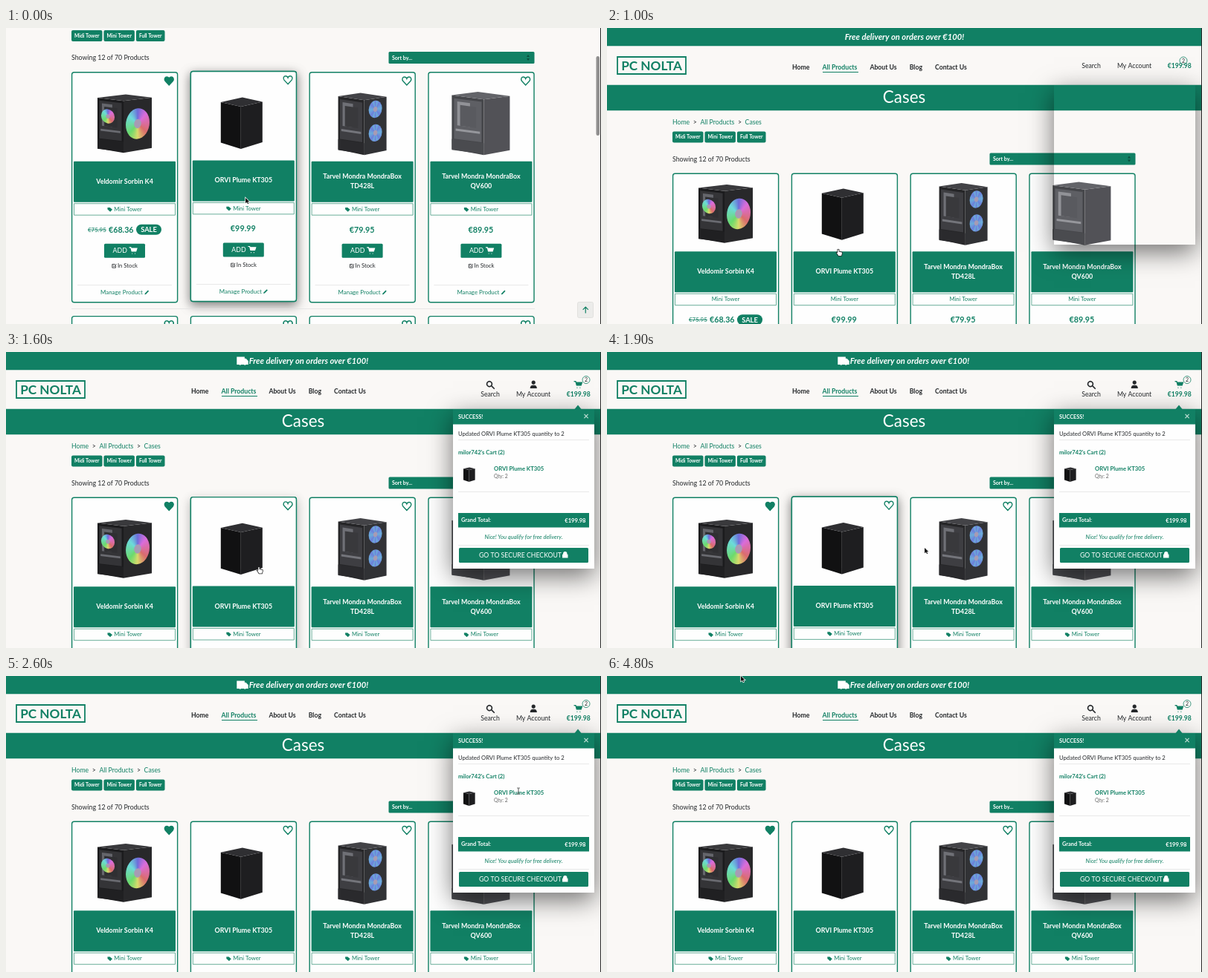
Animation of 800 by 399 pixels, one loop 4.9 s. Source, as an HTML page with a canvas:

```html
<!DOCTYPE html>
<html lang="en">
<head>
<meta charset="utf-8">
<title>Shop cart</title>
<style>
html, body { margin: 0; width: 100%; height: 100%; overflow: hidden; background: #faf8f6; }
canvas { display: block; width: 100vw; height: 100vh; }
</style>
</head>
<body>
<canvas id="stage" width="800" height="399"></canvas>
<script>
const W = 800, H = 399, LOOP = 4900, STEP = 100, RELOAD = 1000;
const SCROLL = 136.5, LEFT = 88, PITCH = 159.8, CARD_W = 142;
const GREEN = '#118064', CREAM = '#faf8f6', INK = '#25282b', LINE = '#e2e2e2';
const stage = document.getElementById('stage').getContext('2d');
let g = stage;

const clamp = v => Math.max(0, Math.min(1, v));
const mix = (a, b, k) => a + (b - a) * k;
const span = (t, a, b) => clamp((t - a) / (b - a));
const ramp = (t, a, b) => { const k = span(t, a, b); return k * k * (3 - 2 * k); };

// Outlines on a 16 unit grid
const ICONS = {
  heart: 'M8 15L1.5 8C-1 5 1 1 4 1Q7 1 8 4Q9 1 12 1C15 1 17 5 14.5 8Z',
  cart: 'M0 1H3L5 9H14L16 3H4M6 14h0M12 14h0',
  tag: 'M0 2H8L16 9 9 16 0 8Z',
  pencil: 'M1 15L2 11 12 1 15 4 5 14Z',
  truck: 'M0 2H10V5H13L16 8V12H0ZM4 13h0M12 13h0',
  user: 'M8 0A4 4 0 1 1 7.9 0ZM1 16Q1 9 8 9.5Q15 9 15 16Z',
  search: 'M11 6.5A4.8 4.8 0 1 1 11 6.4M10 10L15 15',
  lock: 'M2 8H14V15H2ZM4 8V5A4 4 0 0 1 12 5V8',
  check: 'M13 8V14H2V3H10M5 7.5L8 10.5 14.5 3',
  up: 'M8 15V2M2.5 7.5L8 2 13.5 7.5',
  arrow: 'M0 0V13.5L3.5 11 6 15.5 8 14.5 5.5 10H10Z',
  hand: 'M4 1.5Q5.3 0 6.5 1.5V6L14 8V11L12.5 16H6L1.5 9H4Z'
};
for (const k in ICONS) ICONS[k] = new Path2D(ICONS[k]);

function icon(name, x, y, size, fill, line = 0, stroke = fill) {
  g.save();
  g.translate(x, y);
  g.scale(size / 16, size / 16);
  g.lineCap = 'round';
  g.lineWidth = line;
  g.strokeStyle = stroke;
  if (line) g.stroke(ICONS[name]);
  if (fill) { g.fillStyle = fill; g.fill(ICONS[name]); }
  g.restore();
}

const outline = (name, x, y, size, color, line = 2) => icon(name, x, y, size, null, line, color);

function text(s, x, y, size, color, style = '', align = 'left') {
  g.font = `${style} ${size}px Lato, sans-serif`;
  g.textAlign = align;
  g.fillStyle = color;
  g.fillText(s, x, y + size * 0.36);
  return g.measureText(s).width;
}

function row(words, x, y, size, gap, style, color) {
  for (const s of words) x += text(s, x, y, size, color(s), style) + gap;
}

function rect(x, y, w, h, fill, r = 0, stroke = null, line = 1) {
  g.beginPath();
  g.roundRect(x, y, w, h, r);
  if (fill) { g.fillStyle = fill; g.fill(); }
  if (stroke) { g.strokeStyle = stroke; g.lineWidth = line; g.stroke(); }
}

function poly(color, ...points) {
  g.beginPath();
  for (const p of points) g.lineTo(...p);
  g.closePath();
  g.fillStyle = color;
  g.fill();
}

function oval(x, y, rx, ry, fill) {
  g.beginPath();
  g.ellipse(x, y, rx, ry, 0, 0, 7);
  g.fillStyle = fill;
  g.fill();
}

function shadowed(alpha, blur, dy, draw) {
  g.save();
  g.shadowColor = `rgba(0,0,0,${alpha})`;
  g.shadowBlur = blur;
  g.shadowOffsetY = dy;
  draw();
  g.restore();
}

function fan(x, y, rx, ry, hue, range) {
  const glow = g.createConicGradient(0, x, y), n = 12;
  for (let i = 0; i <= n; i++) {
    const h = range < 360 ? hue + range * Math.sin(i * Math.PI) + range * (i % 2) : hue + range * i / n;
    glow.addColorStop(i / n, `hsl(${h},60%,64%)`);
  }
  oval(x, y, rx, ry, glow);
  oval(x, y, rx * 0.3, ry * 0.3, '#a79bb4');
}

// Maps a unit square onto a slanted face.
function onFace([x0, y0], [x1, y1], h, draw) {
  g.save();
  g.transform(x1 - x0, y1 - y0, 0, h, x0, y0);
  draw();
  g.restore();
}

// A box seen at its near corner; edges recede by the slope.
function tower({ l, m, r, y, h, slope, tone, side, front }) {
  const grey = k => `hsl(230,3%,${tone + k}%)`;
  const top = x => [x, y - slope * Math.abs(x - m)];
  const low = x => [x, y + h - slope * 1.4 * Math.abs(x - m)];
  const back = [l + r - m, y - slope * (r - l)];
  poly(grey(0), top(l), top(m), low(m), low(l));
  poly(grey(5), top(m), top(r), low(r), low(m));
  poly(grey(12), top(l), back, top(r), top(m));
  if (side) onFace(top(l), top(m), h - slope * 10, () => side(grey));
  if (front) onFace(top(m), top(r), h - slope * 10, front);
}

function glass(grey) {
  rect(0.07, 0.05, 0.86, 0.74, grey(10));
  rect(0.17, 0.1, 0.4, 0.44, grey(30));
  rect(0.26, 0.16, 0.5, 0.38, grey(8));
  rect(0.12, 0.6, 0.76, 0.04, grey(32));
  rect(0, 0.8, 1, 0.2, grey(2));
}

const ITEM = 'ORVI Plume KT305', BOX = 'Tarvel Mondra MondraBox';
const PRODUCTS = [
  {
    name: ['Veldomir Sorbin K4'], price: '€68.36', was: '€75.95', liked: true,
    box: {
      l: 35, m: 70, r: 108, y: 39, h: 70, slope: 0.12, tone: 11,
      side: grey => { glass(grey); fan(0.4, 0.34, 0.26, 0.14, 330, 360); },
      front: () => fan(0.5, 0.48, 0.42, 0.3, 330, 360)
    }
  },
  { name: [ITEM], price: '€99.99', box: { l: 41, m: 68, r: 97, y: 48, h: 57, slope: 0.22, tone: 7 } },
  {
    name: [BOX, 'TD428L'], price: '€79.95',
    box: {
      l: 39, m: 74, r: 104, y: 38, h: 74, slope: 0.15, tone: 15, side: glass,
      front: () => { for (const y of [0.2, 0.64]) fan(0.5, y, 0.3, 0.16, 205, 25); }
    }
  },
  { name: [BOX, 'QV600'], price: '€89.95', box: { l: 32, m: 75, r: 110, y: 37, h: 75, slope: 0.13, tone: 28, side: glass } }
];

function addButton(hover) {
  const e = hover;
  rect(44 - e, 231.5 - e, 55 + 2 * e, 19 + 2 * e, GREEN, 1.5);
  g.globalAlpha = hover;
  rect(44, 231.5, 55, 19, '#fff', 1);
  g.globalAlpha = 1;
  const ink = hover > 0.5 ? GREEN : '#fff';
  text('ADD', 55.5, 241, 8.8, ink);
  icon('cart', 78, 236, 10, ink, 1.8);
}

function price({ price, was }) {
  const mid = CARD_W / 2, y = 212.5;
  if (!was) return text(price, mid, y, 10.8, GREEN, 'bold', 'center');
  rect(22, y, text(was, 22, y, 7.9, GREEN), 0.8, GREEN);
  text(price, 50, y, 10.7, GREEN, 'bold');
  rect(87, y - 7, 34, 14, GREEN, 7);
  text('SALE', 104, y, 9.3, '#fff', 'bold', 'center');
}

function frame(x, y, lift) {
  const draw = () => rect(x + 0.6, y + 0.6, CARD_W, 310, '#fefefe', 3, GREEN, 1.4);
  if (lift) shadowed(0.5 * lift, 14, 4, draw);
  draw();
}

function card(i, dy, lift, ready, hover) {
  const p = PRODUCTS[i], x = LEFT + i * PITCH, y = 59.2 + dy - 1.3 * lift, mid = 71.5;
  frame(x, y, lift);
  g.save();
  g.translate(x, y);
  if (ready) icon('heart', 125, 6, 12.5, p.liked ? GREEN : null, 1.8, GREEN);
  else g.translate(0, -15);
  tower(p.box);
  rect(3, 120.5, 137, 55, GREEN, 1);
  p.name.forEach((s, k) => text(s, mid, 147.3 + (k - (p.name.length - 1) / 2) * 13.2, 8.9, '#fff', 'bold', 'center'));
  rect(3.5, 177.5, 136, 15.5, null, 0, '#5aa58f', 0.9);
  text('Mini Tower', ready ? mid + 4.5 : mid, 185, 7.6, GREEN, '', 'center');
  if (ready) icon('tag', 48.5, 182, 6.5, GREEN);
  price(p);
  addButton(hover);
  outline('check', 54, 258, 6.8, INK);
  text('In Stock', 62, 261.5, 7.7, INK);
  rect(8, 287, 127, 0.8, LINE);
  text('Manage Product', 39, 297.2, 7.9, GREEN);
  icon('pencil', 98, 294, 6.5, GREEN);
  g.restore();
}

function filters(dy) {
  let x = LEFT;
  for (const size of ['Midi', 'Mini', 'Full']) {
    g.font = 'bold 6.7px Lato, sans-serif';
    const s = size + ' Tower', w = g.measureText(s).width + 8;
    rect(x, 3 + dy, w, 15, GREEN, 2);
    text(s, x + 4, 10.5 + dy, 6.7, '#fff', 'bold');
    x += w + 2;
  }
  text('Showing 12 of 70 Products', LEFT, 40 + dy, 8.8, INK);
  rect(514.5, 32 + dy, 196, 16, GREEN, 1.5);
  text('Sort by...', 519, 40 + dy, 7, '#fff', 'bold');
  for (const s of [-1, 1]) {
    const y = 40 + dy + s;
    poly('#0a4d3c', [700, y], [702, y + 3 * s], [704, y]);
  }
}

function shop(t, dy, ready) {
  filters(dy);
  const fresh = t >= RELOAD;
  const lifts = [
    0,
    fresh ? ramp(t, 1500, 1700) * (1 - ramp(t, 1900, 2400)) : 1,
    ramp(t, 1900, 2200) * (1 - ramp(t, 2200, 2600)),
    0
  ];
  const press = fresh ? 0 : ramp(t, 200, 500);
  lifts.forEach((v, i) => card(i, dy, v, ready, i === 1 ? press : 0));
}

function fold(t) {
  rect(LEFT, 378, 623, 0.8, LINE);
  for (let i = 0; i < PRODUCTS.length; i++) {
    frame(LEFT + i * PITCH, 388, 0);
    outline('heart', 213 + i * PITCH, 394, 12.5, GREEN);
  }
  rect(768.5, 369.5, 21, 21, '#ececea', 2, '#dcdcda', 0.8);
  outline('up', 774.5, 375, 9.5, GREEN);
  rect(793.5, 38, 4.5, 107, `rgba(125,125,125,${0.85 * (1 - ramp(t, 0, 400))})`, 2.2);
}

function header(ready) {
  rect(0, 0, W, 24.3, GREEN);
  text('Free delivery on orders over €100!', ready ? 407 : 400, 12.3, 11.2, '#fff', 'italic bold', 'center');
  rect(14, 39, 92, 23, null, 0, GREEN, 1.8);
  text('PC NOLTA', 60, 50.5, 17.2, GREEN, 'bold', 'center');

  const here = 'All Products';
  row(['Home', here, 'About Us', 'Blog', 'Contact Us'], 249, 52.8, 8.7, 17, 'bold', s => s === here ? GREEN : INK);
  rect(290, 59, 48, 1, GREEN);
  const y = ready ? 57 : 50.5;
  text('Search', 651, y, 8.7, INK, '', 'center');
  text('My Account', 709, y, 8.7, INK, '', 'center');
  text('€199.98', 769.7, y, 8.6, GREEN, 'bold', 'center');
  if (ready) {
    icon('truck', 311.5, 6, 13, '#fff', 3);
    outline('search', 645.5, 38.5, 11.5, INK, 2.3);
    icon('user', 704, 38.5, 10.5, INK);
    icon('cart', 764, 39, 10.5, GREEN, 1.8);
  }
  const bx = ready ? 780 : 775, by = ready ? 37.5 : 44;
  rect(bx - 5, by - 5, 10, 10, null, 5, GREEN, 0.8);
  text('2', bx, by, 7, INK, '', 'center');

  rect(0, 76.7, W, 34.6, GREEN);
  text('Cases', 399.5, 92.5, 22.4, '#fff', '', 'center');
  row(['Home', '>', here, '>', 'Cases'], LEFT, 126.7, 8.7, 4.6, '', s => s === '>' ? INK : GREEN);
}

const TOAST = [601, 77, 190, 215];

function cartPanel() {
  poly(GREEN, [764.5, 77], [769, 71.5], [773.5, 77]);
  rect(...TOAST, '#fefefe');
  rect(601, 77, 190, 20.5, GREEN);
  text('SUCCESS!', 608, 87.3, 7.3, '#fff', 'bold');
  text('×', 780, 86.5, 13, '#b9d9cf', 'bold', 'center');
  text(`Updated ${ITEM} quantity to 2`, 608, 110, 7.7, INK);
  text("milor742's Cart (2)", 608, 135, 7.6, GREEN, 'bold');
  for (const y of [118, 188, 260]) rect(608, y, 176, 0.8, LINE);
  g.save();
  g.translate(603.5, 145.5);
  g.scale(0.28, 0.28);
  tower(PRODUCTS[1].box);
  g.restore();
  text(ITEM, 656, 157.2, 7.7, GREEN, 'bold');
  text('Qty: 2', 656, 168, 6.8, '#666');
  rect(608, 217, 176, 19.5, GREEN);
  text('Grand Total:', 612, 226.8, 7.4, '#fff', 'bold');
  text('€199.98', 779.5, 226.8, 7.6, '#fff', 'bold', 'right');
  text('Nice! You qualify for free delivery.', 696, 249, 7.6, GREEN, 'italic', 'center');
  rect(609, 264, 174, 20, GREEN, 1.5);
  text('GO TO SECURE CHECKOUT', 636, 274, 8.7, '#fff');
  icon('lock', 747.5, 269, 8.5, '#fff', 2);
}

// Drawn once, so that the whole panel fades as one.
const panel = document.createElement('canvas');
panel.width = W;
panel.height = H;
g = panel.getContext('2d');
cartPanel();
g = stage;

function showPanel(t) {
  g.save();
  g.beginPath();
  g.rect(0, 0, W, H);
  g.rect(...TOAST);
  g.clip('evenodd');
  shadowed(0.55, 32, 10, () => rect(...TOAST, '#000'));
  g.restore();
  g.globalAlpha = 1 - (1 - span(t, RELOAD, 1300)) ** 2;
  g.drawImage(panel, 0, 0);
  g.globalAlpha = 1;
}

// Pointer moves: begin, end, x, y
const MOVES = [
  [0, 500, 311, 298], [1500, 1900, 427, 264], [1900, 2600, 689, 155],
  [3400, 3700, 557, 172], [3900, 4200, 357, 99], [4300, 4800, 180, 0]
];

function pointer(t) {
  let x = 322, y = 229;
  for (const [a, b, tx, ty] of MOVES) {
    const k = span(t, a, b);
    x = mix(x, tx, k);
    y = mix(y, ty, k);
  }
  if (t >= 2600 && t < 3500) {
    rect(x - 0.5, y - 4, 1, 8, '#555');
    for (const s of [-4, 4]) rect(x - 2, y + s - 0.4, 4, 0.8, '#555');
  } else if (t >= 400 && t < 1700) icon('hand', x - 3, y, 9, '#fff', 2.8, '#222');
  else icon('arrow', x, y, 8.5, '#111', 2.6, '#fff');
}

function draw(t) {
  rect(0, 0, W, H, CREAM);
  if (t < RELOAD) {
    shop(t, 0, true);
    fold(t);
  } else {
    const ready = t >= RELOAD + STEP;
    shop(t, SCROLL, ready);
    header(ready);
    showPanel(t);
  }
  rect(799, 0, 1, H, '#2a2a2a');
  pointer(t);
}

const start = performance.now();
function tick() {
  const t = (performance.now() - start) % LOOP;
  draw(Math.floor(t / STEP) * STEP);
  requestAnimationFrame(tick);
}
tick();
</script>
</body>
</html>
```
